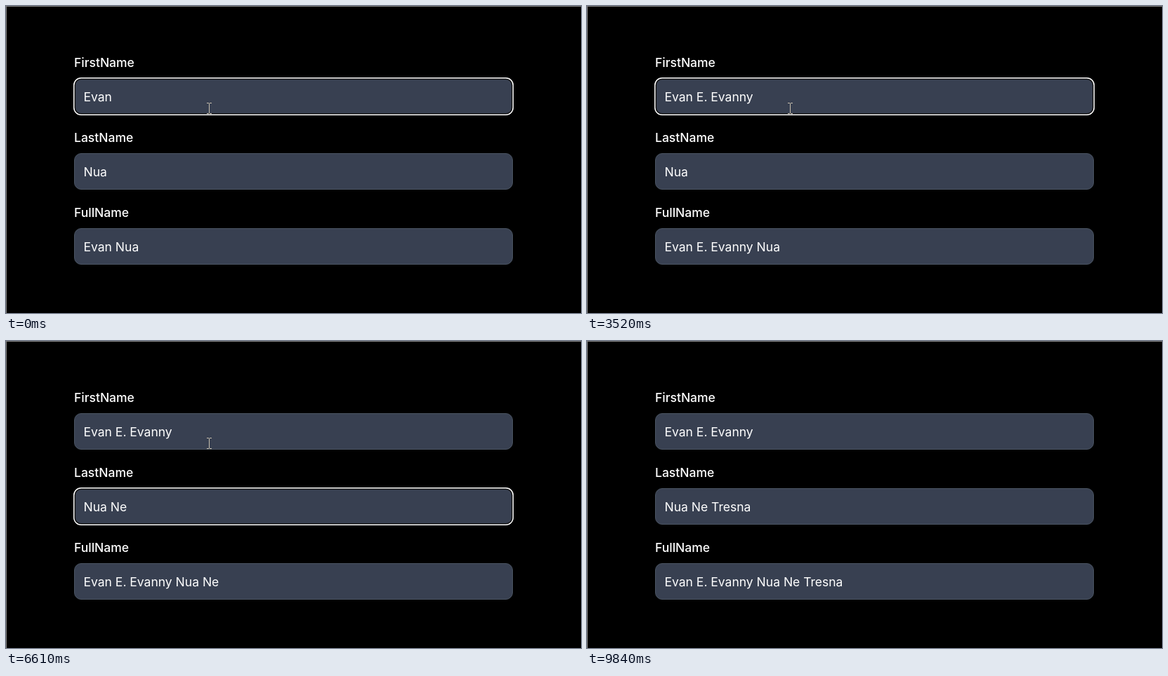
An HTML page that plays this animation: 819x438 px, repeating every 9860 ms.

```html
<!DOCTYPE html>
<html lang="en">
<head>
<meta charset="utf-8">
<title>Full name form</title>
<style>
  html, body { margin: 0; width: 100%; height: 100%; overflow: hidden; background: #000; }
  #stage {
    position: relative; width: 819px; height: 438px; box-sizing: border-box;
    border: solid #808080; border-width: 1px 0 0 1px; overflow: hidden;
    font: 17.5px/25px Inter, sans-serif; color: #fff;
  }
  /* offsets make up for the 1px frame line */
  .row { position: absolute; left: 96px; width: 625px; }
  .row:nth-child(1) { top: 67px; }
  .row:nth-child(2) { top: 174px; }
  .row:nth-child(3) { top: 281px; }
  .label { font-weight: 500; height: 25px; }
  .field {
    position: relative; margin-top: 10px; height: 52px; box-sizing: border-box;
    padding: 12.5px 12.5px; border: 1px solid #4b5563; border-radius: 10px;
    background: #384051; white-space: pre;
  }
  .focus::after {
    content: ""; position: absolute; inset: -2px; border-radius: 11px;
    box-shadow: inset 0 0 0 1.5px #fff, inset 0 0 0 3px #101010;
  }
  .selected span { background: #0b6adc; }
  .caret { position: absolute; top: 14px; width: 1px; height: 21px; background: #fff; visibility: hidden; }
  .caret.on { visibility: visible; }
  svg { position: absolute; left: -1px; top: -1px; }
  svg g { visibility: hidden; }
  svg g.on { visibility: visible; }
</style>
</head>
<body>
<div id="stage">
  <div class="row"><div class="label">FirstName</div><div class="field"><span></span><i class="caret"></i></div></div>
  <div class="row"><div class="label">LastName</div><div class="field"><span></span><i class="caret"></i></div></div>
  <div class="row"><div class="label">FullName</div><div class="field"><span></span></div></div>
  <svg width="819" height="438">
    <g id="beam" fill="#c7bfae" shape-rendering="crispEdges">
      <path d="M286 138h3v1h-3zM290 138h3v1h-3zM289 139h1v14h-1zM286 153h3v1h-3zM290 153h3v1h-3z"/>
    </g>
    <g id="arrow">
      <path d="M710.5 367.5v15.5l3.6-3.4 2.4 5.2 2-.9-2.3-5h4.8z" fill="#fff" stroke="#000"/>
    </g>
  </svg>
</div>
<script>
const LOOP = 9860;

// Each step changes part of the state: first, last, focus (0, 1, none = -1), caret, selected, pointer.
const steps = [
  [0, { first: "Evan ", last: "Nua", focus: 0, caret: false, selected: false, pointer: "beam" }],
  [250, { first: "Evan E", caret: true }],
  [800, { first: "Evan E." }],
  [920, { first: "Evan E. " }],
  [1200, { first: "Evan E. E" }],
  [1480, { first: "Evan E. Ev" }],
  [1600, { first: "Evan E. Eva" }],
  [1720, { first: "Evan E. Evah" }],
  [2280, { first: "Evan E. Eva" }],
  [2840, { first: "Evan E. Evan" }],
  [2990, { first: "Evan E. Evanny" }],
  [3520, { caret: false }],
  [4080, { focus: 1, selected: true }],
  [4730, { selected: false, caret: true }],
  [5160, { last: "Nua " }],
  [5710, { last: "Nua N" }],
  [5830, { last: "Nua Ne" }],
  [6080, { last: "Nua Ne " }],
  [6610, { caret: false }],
  [7200, { last: "Nua Ne T", caret: true }],
  [7480, { last: "Nua Ne Tr" }],
  [7630, { last: "Nua Ne Tre" }],
  [7750, { last: "Nua Ne Tres" }],
  [8000, { last: "Nua Ne Tresn" }],
  [8120, { last: "Nua Ne Tresna" }],
  [8680, { caret: false }],
  [9110, { caret: true }],
  [9260, { pointer: "arrow" }],
  [9410, { pointer: "" }],
  [9690, { caret: false }],
  [9840, { focus: -1 }]
];

const fields = [...document.querySelectorAll(".field")];
const texts = fields.map(f => f.querySelector("span"));
const pointers = ["beam", "arrow"].map(id => document.getElementById(id));
let shown = -1;

function draw(n) {
  const s = Object.assign({}, ...steps.slice(0, n + 1).map(step => step[1]));
  const full = (s.first + " " + s.last).replace(/ +/g, " ").trim();
  [s.first, s.last, full].forEach((text, i) => { texts[i].textContent = text; });

  fields.slice(0, 2).forEach((field, i) => {
    const active = s.focus === i;
    const caret = field.querySelector(".caret");
    field.classList.toggle("focus", active);
    field.classList.toggle("selected", active && s.selected);
    caret.classList.toggle("on", active && s.caret);
    const end = texts[i].getBoundingClientRect().right - field.getBoundingClientRect().left;
    caret.style.left = Math.round(end) - 1 + "px";
  });
  pointers.forEach(p => p.classList.toggle("on", p.id === s.pointer));
}

function update(time) {
  const n = steps.filter(step => step[0] <= time).length - 1;
  if (n !== shown) draw(shown = n);
}

const start = performance.now();
function tick() {
  update((performance.now() - start) % LOOP);
  requestAnimationFrame(tick);
}
tick();
</script>
</body>
</html>
```
